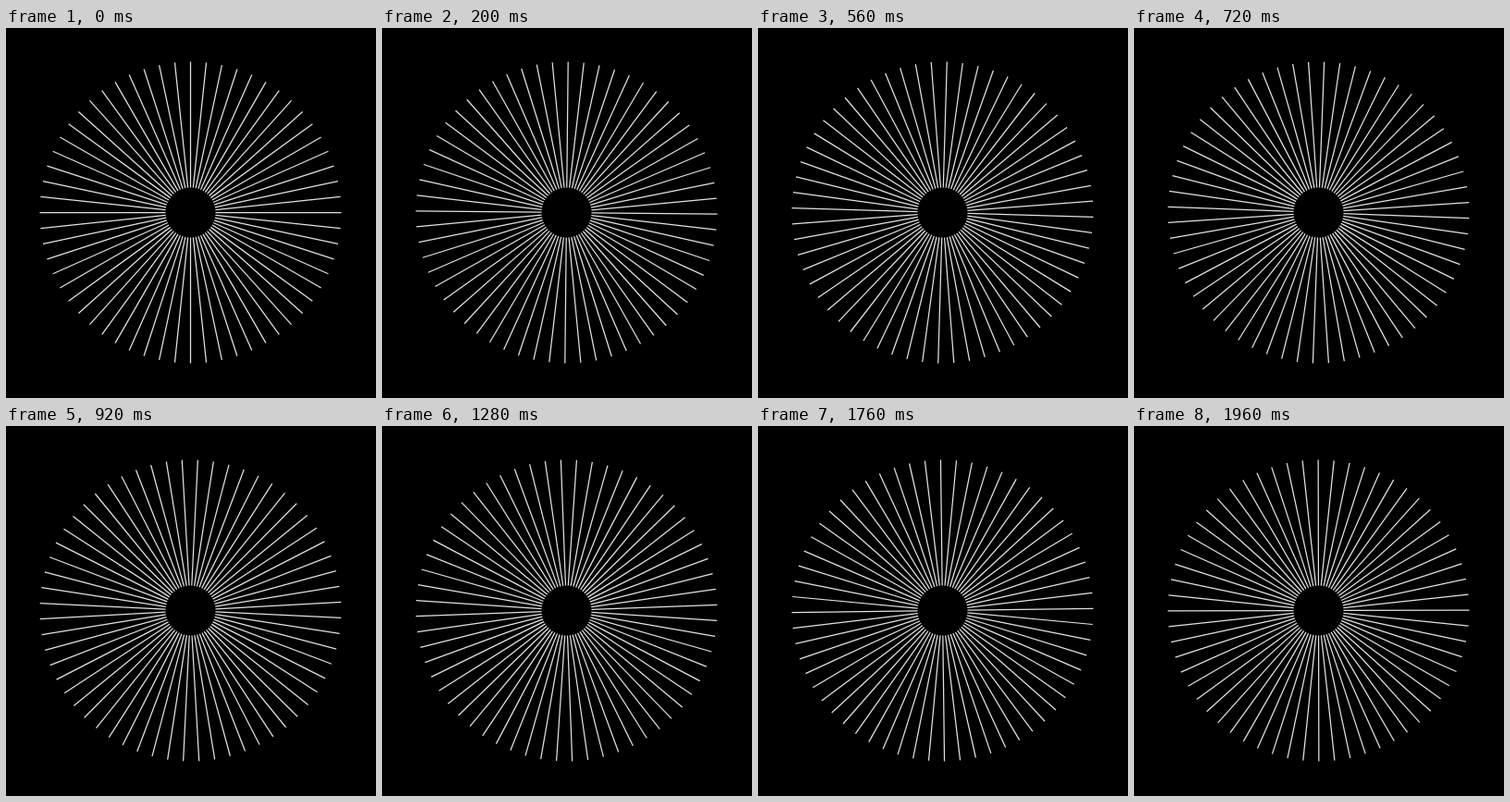
An HTML page with a canvas that plays this animation: 400x400 px, repeating every 2000 ms.

```html
<!DOCTYPE html>
<html lang="en">
<head>
<meta charset="utf-8">
<title>Turning rays</title>
<style>
html, body { margin: 0; height: 100%; overflow: hidden; background: #000; }
canvas { display: block; }
</style>
</head>
<body>
<canvas id="stage" width="400" height="400"></canvas>
<script>
const ctx = document.getElementById('stage').getContext('2d');
const LOOP = 2000, STEP = 40, RAYS = 60;
const CENTER = 199.5, INNER = 27, OUTER = 163;
const GAP = 2 * Math.PI / RAYS;

ctx.strokeStyle = '#e0e0e0';
ctx.lineWidth = 1.25;

function draw(time) {
  // The wheel turns by one ray gap per loop
  const turn = GAP * Math.floor(time % LOOP / STEP) * STEP / LOOP;
  ctx.fillRect(0, 0, 400, 400);
  ctx.beginPath();
  for (let i = 0; i < RAYS; i++) {
    const a = turn + i * GAP, c = Math.cos(a), s = Math.sin(a);
    ctx.moveTo(CENTER + INNER * c, CENTER + INNER * s);
    ctx.lineTo(CENTER + OUTER * c, CENTER + OUTER * s);
  }
  ctx.stroke();
}

const start = performance.now();
function tick() {
  draw(performance.now() - start);
  requestAnimationFrame(tick);
}
tick();
</script>
</body>
</html>
```
